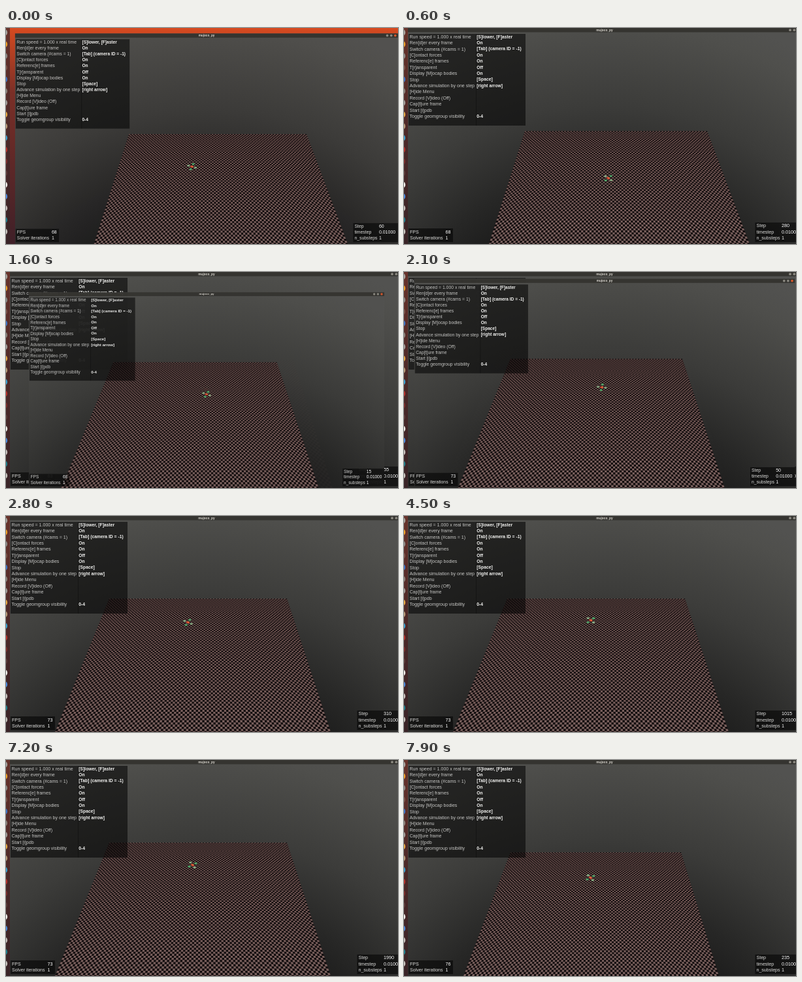
An HTML page with a canvas that plays this animation: 600 px wide and 332 px high, repeating every 8000 ms.

```html
<!DOCTYPE html>
<html lang="en">
<head>
<meta charset="utf-8">
<title>mujoco_py</title>
<style>
html, body { margin: 0; width: 100%; height: 100%; overflow: hidden; background: #222; }
canvas { display: block; }
</style>
</head>
<body>
<canvas id="stage" width="600" height="332"></canvas>
<script>
const W = 600, H = 332, LOOP = 8000, TICK = 100;
const WIN_W = 610, WIN_H = 344;      // window bitmap, larger than the stage
const PIVOT_X = 307, PIVOT_Y = 333;  // fixed point of the opening zoom
const COLS = 120, RATE = 0.37;       // floor columns, simulation steps per ms
const FONT = '"Liberation Sans", Arial, sans-serif';

const ctx = document.getElementById('stage').getContext('2d');

const menu = [
  ['Run speed = 1.000 x real time', '[S]lower, [F]aster'],
  ['Ren[d]er every frame', 'On'],
  ['Switch camera (#cams = 1)', '[Tab] (camera ID = -1)'],
  ['[C]ontact forces', 'On'],
  ['Referenc[e] frames', 'On'],
  ['T[r]ansparent', 'Off'],
  ['Display [M]ocap bodies', 'On'],
  ['Stop', '[Space]'],
  ['Advance simulation by one step', '[right arrow]'],
  ['[H]ide Menu', ''],
  ['Record [V]ideo (Off)', ''],
  ['Cap[t]ure frame', ''],
  ['Start [i]pdb', ''],
  ['Toggle geomgroup visibility', '0-4']
];

// floor: left, right and y of the far edge, then left and right at y = 332
// path: time, x, y, yaw of the drone; steps: time, step (optional)
const episodes = [
  { start: -162, fps: 68, floor: [185, 464, 158.5, 130, 529],
    path: [[0, 284, 210, 0.35], [1300, 346, 256, 1.2]] },
  { start: 1286, fps: 63, floor: [194, 427, 142.5, 91, 498],
    path: [[1300, 311, 178, 0], [1500, 309, 182, 0.3]] },
  { start: 1450, fps: 63, floor: [170, 440, 135, 80, 500],
    path: [[1450, 309, 176, 0.2], [1600, 306, 180, 0.5]] },
  { start: 1560, fps: 68, floor: [149, 426, 118.7, 61, 497],
    path: [[1600, 307, 173, 0.45], [1900, 300, 170, 0.9]] },
  { start: 1970, fps: 73, floor: [158, 430, 127, 75, 497],
    steps: [[1970, 0], [2800, 310], [4500, 1015], [7200, 1990], [8000, 2280]],
    path: [[1970, 308, 174, 0.1], [2400, 290, 168, 0.4], [2800, 278.5, 164, 0.5],
           [3300, 282, 161, 0.65], [4500, 286, 160, 0.8], [7200, 285, 161, 1]] },
  { start: 7265, fps: 76, floor: [163, 424, 142, 91, 482],
    path: [[7265, 306, 184, 0.2], [7900, 285, 181, 0.95]] }
];

const clamp = (v, a, b) => Math.min(b, Math.max(a, v));
const lerp = (a, b, k) => a + (b - a) * k;

// values of a keyed track at time t, linear between keys
function track(keys, t) {
  let i = 0;
  while (i < keys.length - 2 && t > keys[i + 1][0]) i++;
  const [a, b] = [keys[i], keys[i + 1]];
  const k = clamp((t - a[0]) / (b[0] - a[0]), 0, 1);
  return a.slice(1).map((v, n) => lerp(v, b[n + 1], k));
}

function layer() {
  const c = document.createElement('canvas');
  c.width = WIN_W;
  c.height = WIN_H;
  return c.getContext('2d');
}

function text(g, str, x, y, color, font = '7.05px ') {
  g.font = font + FONT;
  g.fillStyle = color;
  g.fillText(str, x, y);
}

function panel(g, x, y, w, h) {
  g.fillStyle = 'rgba(0,0,0,0.55)';
  g.fillRect(x, y, w, h);
}

function dot(g, x, y, r, color) {
  g.fillStyle = color;
  g.beginPath();
  g.arc(x, y, r, 0, 7);
  g.fill();
}

// checkered plane in perspective
function drawFloor(g, [xl, xr, top, bl, br]) {
  const w0 = xr - xl, grow = (br - bl - w0) / (H - top);
  const horizon = top - w0 / grow, u0 = top - horizon;
  const mid = 170 - horizon;
  const depth = mid * mid / (0.72 * mid * grow / COLS);
  const left = y => lerp(xl, bl, (y - top) / (H - top));
  const right = y => lerp(xr, br, (y - top) / (H - top));
  const at = (i, y) => lerp(left(y), right(y), i / COLS);
  const rowY = j => horizon + 1 / (1 / u0 - j / depth);

  g.fillStyle = '#110c0d';
  g.beginPath();
  g.moveTo(xl, top);
  g.lineTo(xr, top);
  g.lineTo(right(WIN_H), WIN_H);
  g.lineTo(left(WIN_H), WIN_H);
  g.fill();

  const light = g.createLinearGradient(0, top, 0, H);
  light.addColorStop(0, '#6b4f4c');
  light.addColorStop(1, '#7a615e');
  g.fillStyle = light;
  g.beginPath();
  for (let j = 0; rowY(j) < WIN_H; j++) {
    const a = rowY(j), b = rowY(j + 1);
    for (let i = j % 2; i < COLS; i += 2) {
      g.moveTo(at(i, a), a);
      g.lineTo(at(i + 1, a), a);
      g.lineTo(at(i + 1, b), b);
      g.lineTo(at(i, b), b);
      g.closePath();
    }
  }
  g.fill();
}

// everything in a window that stays the same
function paintBase(g, floor) {
  g.textBaseline = 'middle';
  // the sky darkens towards the point straight below the camera
  const sky = g.createRadialGradient(PIVOT_X, 556, 224, PIVOT_X, 556, 600);
  sky.addColorStop(0, '#131313');
  sky.addColorStop(0.3, '#272726');
  sky.addColorStop(0.57, '#3c3c3a');
  sky.addColorStop(0.9, '#4f4f4c');
  sky.addColorStop(1, '#525250');
  g.fillStyle = sky;
  g.fillRect(6, 0, 602, WIN_H);
  drawFloor(g, floor);

  g.fillStyle = '#353430';
  g.fillRect(6, 0, 602, 6.5);
  g.textAlign = 'center';
  text(g, 'mujoco_py', PIVOT_X, 3.2, '#dcd9d2', 'bold 4.8px ');
  g.textAlign = 'left';
  ['#8b8981', '#8b8981', '#d8582c'].forEach((c, i) => dot(g, 591 + i * 6.3, 3.2, 1.9, c));

  panel(g, 7, 9, 179, 141);
  g.fillStyle = 'rgba(0,0,0,0.3)';
  g.fillRect(110, 9, 1, 141);
  menu.forEach(([label, value], i) => {
    const y = 13.8 + i * 9.4;
    text(g, label, 8.5, y, '#c6c6c4');
    text(g, value, 111.3, y, '#f4f4f2', 'bold 6.75px ');
  });

  panel(g, 7, 308, 68, 21);
  text(g, 'FPS', 9, 313.6, '#dededc');
  text(g, 'Solver iterations', 9, 323.2, '#dededc');
  text(g, '1', 63.5, 323.2, '#fff', '7.2px ');
  panel(g, 537.5, 299, 70.5, 30);
  ['Step', 'timestep', 'n_substeps'].forEach((s, i) => text(g, s, 539.5, 304.2 + i * 9.5, '#dededc'));
  text(g, '0.01000', 578, 313.7, '#fff', '7.2px ');
  text(g, '1', 578, 323.2, '#fff', '7.2px ');
}

function drawDrone(g, x, y, yaw) {
  g.save();
  g.translate(x, y);
  g.lineWidth = 1.1;
  g.strokeStyle = '#3c4a3a';
  for (let i = 0; i < 4; i++) {
    const a = yaw + i * Math.PI / 2;
    const px = Math.cos(a) * 6, py = Math.sin(a) * 4.6;
    g.beginPath();
    g.moveTo(0, 0);
    g.lineTo(px, py);
    g.stroke();
    g.fillStyle = i % 2 ? '#4fae6c' : '#8fb58a';
    g.beginPath();
    g.ellipse(px, py, 2.2, 1.3, 0, 0, 7);
    g.fill();
  }
  g.fillStyle = '#de4630';
  g.beginPath();
  g.ellipse(0, 0, 2.7, 1.5, yaw / 2, 0, 7);
  g.fill();
  dot(g, 0.8, -0.7, 0.8, '#e8a04a');
  g.restore();
}

const scratch = layer();

function drawWindow(ep, t, settled) {
  const age = t - ep.start;
  const shrink = settled ? 0 : 4.4 / (age + 5.6) * clamp((300 - age) / 138, 0, 1);
  const sx = 1 - shrink, sy = 1 - shrink * 0.97;
  const g = scratch;
  g.clearRect(0, 0, WIN_W, WIN_H);
  g.save();
  g.textBaseline = 'middle';
  // a zooming window is painted anew so that its details stay crisp
  if (shrink > 0) {
    g.transform(sx, 0, 0, sy, PIVOT_X * (1 - sx), PIVOT_Y * (1 - sy));
    paintBase(g, ep.floor);
  } else {
    g.drawImage(ep.base, 0, 0);
  }

  const [x, y, yaw] = track(ep.path, t);
  const sway = age > 400 ? 0.5 : 0;
  drawDrone(g, x + sway * Math.sin(age / 260), y + sway * Math.sin(age / 190), yaw);

  const step = ep.steps ? track(ep.steps, t)[0] : age * RATE;
  text(g, String(Math.round(step / 5) * 5), 578, 304.2, '#fff', '7.2px ');
  text(g, String(ep.start < 0 && t > 600 ? 75 : ep.fps), 63.5, 313.6, '#fff', '7.2px ');
  g.restore();

  ctx.globalAlpha = 1 - 5 * shrink * shrink;
  ctx.drawImage(g.canvas, 0, 0);
  ctx.globalAlpha = 1;
}

function drawDesktop() {
  const paper = ctx.createLinearGradient(0, 0, 0, H);
  paper.addColorStop(0, '#d64a20');
  paper.addColorStop(0.3, '#7a2f27');
  paper.addColorStop(1, '#3f2028');
  ctx.fillStyle = paper;
  ctx.fillRect(0, 0, W, H);
}

const icons = ['#a8a49e', '#f0a024', '#8d8a86', '#7a5248', '#3d74c8', '#8a8078', '#a09c98', '#e8a840', '#b89a78',
  '#38a0d0', '#b8302a', '#7a2c2a', '#5a3a38', '#f0eeea', '#4a8ae0', '#c8c0bc', '#1f7f8c', '#c8c4be'];

function drawDock() {
  const g = ctx.createLinearGradient(0, 0, 0, H);
  g.addColorStop(0, '#67332b');
  g.addColorStop(0.5, '#4c2928');
  g.addColorStop(1, '#392427');
  ctx.fillStyle = g;
  ctx.fillRect(0, 0, 6, H);
  icons.forEach((c, i) => dot(ctx, -3, 7 + i * 18, 5.2, c));
}

function frame() {
  const now = (performance.now() + 8) % LOOP;
  const t = Math.floor(now / TICK) * TICK;
  let n = episodes.length - 1;
  while (episodes[n].start > t) n--;
  drawDesktop();
  if (n > 0) drawWindow(episodes[n - 1], t, true);
  drawWindow(episodes[n], t, false);
  drawDock();
  requestAnimationFrame(frame);
}

episodes.forEach(ep => {
  const g = layer();
  paintBase(g, ep.floor);
  ep.base = g.canvas;
});
frame();
</script>
</body>
</html>
```
